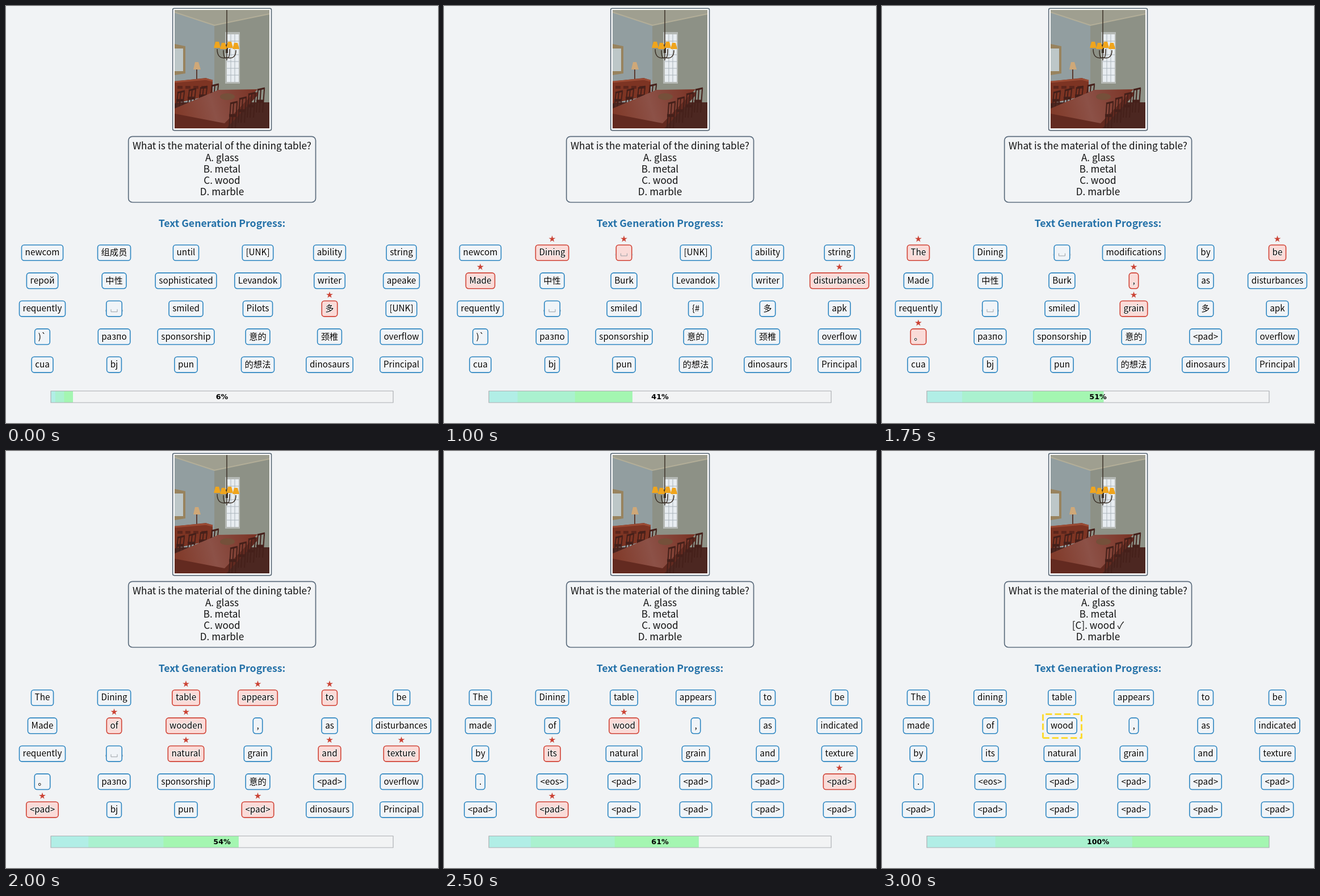
Animation, 761 px wide and 736 px high, one loop 8250 ms. Source, as an HTML page with a canvas:

```html
<!DOCTYPE html>
<html lang="zh-CN">
<head>
<meta charset="utf-8">
<title>Text generation progress</title>
<style>
html, body { margin: 0; width: 100%; height: 100%; overflow: hidden; background: #f1f3f5; }
canvas { display: block; }
</style>
</head>
<body>
<canvas id="stage" width="761" height="736"></canvas>
<script>
const ctx = document.getElementById('stage').getContext('2d');
const SANS = '"Noto Sans CJK SC", "Noto Sans CJK JP", "Noto Sans", "DejaVu Sans", sans-serif';
const LOOP = 8250, STEP = 250, LAST = 12, TOTAL = 31, MID = 380.5;
const RED = '#d04336', BLUE = '#2e86c1', BLANK = '␣';

// Each cell: its first word, then "step:word" for every replacement
const grid = [
  ['newcom 5:That 7:The', '组成员 4:Dining 11:dining', 'until 4:␣ 8:table',
    '[UNK] 5:modifications 8:appears', 'ability 5:by 8:to', 'string 7:be'],
  ['герой 2:blade 4:Made 9:made', '中性 8:of', 'sophisticated 3:Burk 8:wooden 10:wood',
    'Levandok 7:,', 'writer 5:as', 'apeake 4:disturbances 9:indicated'],
  ['requently 9:by', '␣ 10:its', 'smiled 8:natural',
    'Pilots 2:{# 7:grain', '颈 0:多 8:and', '[UNK] 1:apk 8:texture'],
  [')` 7:。 9:.', 'разпо 9:<eos>', 'sponsorship 9:<pad>',
    '意的 9:<pad>', '颈椎 6:<pad>', 'overflow 10:<pad>'],
  ['cua 8:<pad>', 'bj 10:<pad>', 'pun 9:<pad>',
    '的想法 8:<pad>', 'dinosaurs 9:<pad>', 'Principal 9:<pad>']
];

function wordAt(history, step) {
  const [first, ...changes] = history.split(' ');
  let word = first, hot = false;
  for (const change of changes) {
    const [when, next] = change.split(':');
    if (+when > step) break;
    word = next;
    hot = +when === step;
  }
  return { word, hot };
}

// Fast start, then one token per step, then a jump to the end
const doneAt = step => step === LAST ? TOTAL : Math.min(2 + 4 * step, 9 + step);

function rect(x, y, w, h, fill) {
  ctx.fillStyle = fill;
  ctx.fillRect(x, y, w, h);
}

function trace(points) {
  ctx.beginPath();
  for (let i = 0; i < points.length; i += 2) ctx.lineTo(points[i], points[i + 1]);
}

function poly(fill, ...points) {
  trace(points);
  ctx.fillStyle = fill;
  ctx.fill();
}

function line(color, width, ...points) {
  trace(points);
  ctx.strokeStyle = color;
  ctx.lineWidth = width;
  ctx.stroke();
}

function roundBox(x, y, w, h, r, fill, edge, width) {
  ctx.beginPath();
  ctx.roundRect(x, y, w, h, r);
  ctx.fillStyle = fill;
  ctx.fill();
  ctx.strokeStyle = edge;
  ctx.lineWidth = width;
  ctx.stroke();
}

function label(str, y, font, color) {
  ctx.font = font;
  ctx.fillStyle = color;
  ctx.fillText(str, MID, y);
}

function star(x, y, r) {
  ctx.beginPath();
  for (let i = 0; i < 10; i++) {
    const a = i * Math.PI / 5 - Math.PI / 2, d = i % 2 ? r * 0.382 : r;
    ctx.lineTo(x + d * Math.cos(a), y + d * Math.sin(a));
  }
  poly.call;
  ctx.fillStyle = '#cb4335';
  ctx.fill();
}

function chair(x, y, h) {
  const wood = '#45201a';
  for (const dx of [0, 5, 11]) line(wood, 2, x + dx + 3, y, x + dx, y + h);
  line(wood, 3, x + 2, y + 1, x + 15, y - 2);
  rect(x, y + h * 0.45, 13, 5, wood);
}

function room() {
  ctx.save();
  ctx.beginPath();
  ctx.rect(297, 7, 167, 209);
  ctx.clip();

  rect(297, 7, 70, 209, '#929ea0');
  rect(367, 7, 97, 209, '#8d9186');
  poly('#9f9f90', 297, 7, 464, 7, 464, 14, 367, 34, 297, 11);
  line('#b3ae98', 2, 297, 11, 367, 34, 464, 14);
  poly('#4c2721', 297, 170, 464, 170, 464, 216, 297, 216);

  // Window, mirror and lamp
  rect(386, 46, 26, 91, '#b5b9b5');
  rect(389, 50, 21, 84, '#e8edf1');
  for (let y = 62; y < 132; y += 12) line('#aab4bb', 1, 389, y, 410, y);
  for (const x of [396, 403]) line('#aab4bb', 1, x, 50, x, 134);
  poly('#98835e', 297, 67, 316, 71, 316, 119, 297, 122);
  rect(297, 75, 15, 40, '#bdc7c8');
  poly('#cfa878', 333, 99, 339, 99, 343, 112, 330, 112);
  rect(335, 112, 2, 17, '#5a3b30');

  // Sideboard
  poly('#7d3423', 297, 133, 352, 127, 364, 131, 364, 157, 297, 172);
  line('#9b4b34', 3, 297, 134, 352, 129, 364, 132);
  for (let x = 302; x < 358; x += 14) rect(x, 141, 9, 5, '#5c261c');

  // Table with its chairs
  for (let i = 0; i < 4; i++) chair(300 + i * 20, 152 - i * 4, 27);
  poly('#632a20', 297, 184, 443, 152, 443, 158, 388, 216, 297, 216);
  const top = ctx.createLinearGradient(300, 190, 440, 150);
  top.addColorStop(0, '#813a29');
  top.addColorStop(0.45, '#8c5147');
  top.addColorStop(1, '#7b3325');
  poly(top, 297, 181, 374, 148, 443, 147, 385, 207, 297, 190);
  ctx.beginPath();
  ctx.ellipse(390, 160, 13, 6, 0, 0, Math.PI * 2);
  ctx.fillStyle = '#75503a';
  ctx.fill();
  for (let i = 0; i < 4; i++) chair(393 + i * 16, 171 - i * 8, 44 - i);

  // Chandelier
  const iron = '#3a3027';
  line(iron, 1.5, 389, 7, 389, 96);
  rect(387, 68, 4, 15, iron);
  for (let i = 0; i < 4; i++) {
    const x = 372 + i * 11, y = 69 + i % 2 * 2;
    ctx.beginPath();
    ctx.moveTo(389, 91);
    ctx.quadraticCurveTo(x, 95, x, y + 7);
    ctx.stroke();
    poly('#f0a51d', x - 3, y - 6, x + 3, y - 6, x + 6, y + 5, x - 6, y + 5);
  }
  ctx.restore();
}

function question(solved) {
  roundBox(215.7, 230.3, 329.8, 116.2, 7, '#f2f4f6', '#5d6d7e', 1.7);
  const lines = ['What is the material of the dining table?', 'A. glass', 'B. metal',
    solved ? '[C]. wood ✓' : 'C. wood', 'D. marble'];
  lines.forEach((str, i) => label(str, Math.round(253.4 + i * 20.25), '17.1px ' + SANS, '#111'));
}

function blankMark(x, y) {
  line('#9aa0a5', 1, x - 5.5, y + 1, x - 5.5, y + 5.5, x + 5.5, y + 5.5, x + 5.5, y + 1);
  for (const dx of [-15, 15]) line('#a9b8c4', 1, x + dx, y + 2, x + dx, y + 5);
}

function token({ word, hot }, col, row) {
  const x = 64 + col * 126.5, y = 435.5 + row * 49.4;
  ctx.font = '15.28px ' + SANS;
  const w = (word === BLANK ? 15.28 : ctx.measureText(word).width) + 12.2;
  roundBox(x - w / 2, y - 13.8, w, 27.6, 4.6, hot ? '#fadbd8' : '#f0f4f8', hot ? RED : BLUE, 1.6);
  if (hot) star(x, y - 24.2, 6.2);
  if (word === BLANK) return blankMark(x, y);
  ctx.strokeStyle = 'rgba(255,255,255,0.8)';
  ctx.lineWidth = 2;
  ctx.strokeText(word, x, y + 4.8);
  ctx.fillStyle = '#000';
  ctx.fillText(word, x, y + 4.8);
}

function progress(part) {
  const x = 79, y = 679.5, h = 20.5, full = 603, w = full * part;
  rect(x, y, full, h, '#f2f3f4');
  rect(x, y, w, h, '#b1eee6');
  rect(x + w * 0.2, y, w * 0.8, h, '#aaf1cf');
  rect(x + w * 0.6, y, w * 0.4, h, '#a4f6b1');
  ctx.strokeStyle = '#adb0b3';
  ctx.lineWidth = 1.2;
  ctx.strokeRect(x, y, full, h);
  label(Math.floor(part * 100) + '%', 693.5, 'bold 12.7px "DejaVu Sans", sans-serif', '#000');
}

function answerFrame() {
  ctx.setLineDash([11.3, 4.9]);
  line('#fcdb32', 3, 283.5, 506.5, 351.5, 506.5, 351.5, 464.5, 283.5, 464.5, 283.5, 506.5);
  ctx.setLineDash([]);
}

function draw(step) {
  rect(0, 0, 761, 736, '#f1f3f5');
  ctx.textAlign = 'center';
  ctx.lineJoin = 'round';
  roundBox(293.7, 4.2, 173.8, 215.4, 2.5, '#fff', '#566573', 1.6);
  room();
  question(step === LAST);
  label('Text Generation Progress:', 389.6, 'bold 17.7px ' + SANS, '#2471a8');
  grid.forEach((cells, row) =>
    cells.forEach((history, col) => token(wordAt(history, step), col, row)));
  progress(doneAt(step) / TOTAL);
  if (step === LAST) answerFrame();
}

const start = performance.now();
let shown = -1;
function tick() {
  const t = (performance.now() - start) % LOOP;
  const step = Math.min(LAST, Math.floor(t / STEP));
  if (step !== shown) draw(shown = step);
  requestAnimationFrame(tick);
}
tick();
</script>
</body>
</html>
```
